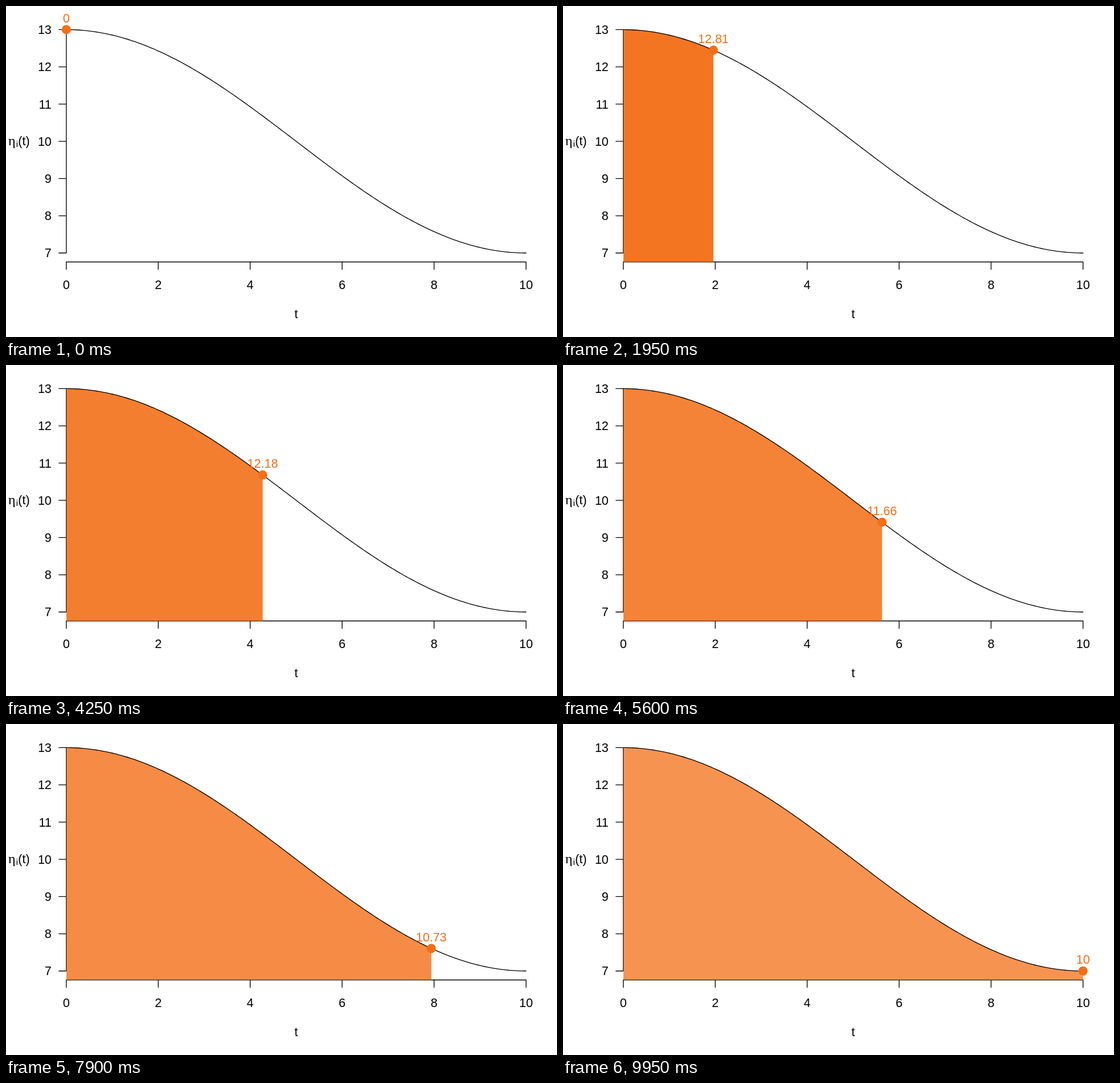
These frames come from a looping animation (966 by 580 pixels, 10 s). An HTML page:

```html
<!DOCTYPE html>
<html lang="en">
<head>
<meta charset="utf-8">
<title>Running mean of a curve</title>
<style>
  html, body { margin: 0; width: 100%; height: 100%; overflow: hidden; background: #fff; }
  svg { display: block; width: 966px; height: 580px; }
  text { font: 21.5px "Liberation Sans", Arial, sans-serif; }
  .line { fill: none; stroke: #000; stroke-width: 1.34; stroke-linecap: round; stroke-linejoin: round; }
  .mid { text-anchor: middle; }
  .end { text-anchor: end; }
  .eta { font: 24px "Liberation Serif", serif; }
  .sub { font-size: 15px; }
  .hot { fill: #f36f17; }
</style>
</head>
<body>
<svg viewBox="0 0 966 580">
  <clipPath id="swept"><rect id="window" x="105.7" y="0" width="0" height="580"/></clipPath>
  <g id="axes">
    <text class="eta" x="4" y="243.5">η</text>
    <text class="sub" x="17.8" y="247">i</text>
    <text x="21.3" y="243.5">(t)</text>
    <text class="mid" x="508.7" y="547.3">t</text>
  </g>
  <path id="area" class="hot" clip-path="url(#swept)"/>
  <path id="curve" class="line"/>
  <circle id="dot" class="hot" r="8.06"/>
  <text id="label" class="hot mid"></text>
</svg>
<script>
  const NS = "http://www.w3.org/2000/svg";
  const LEFT = 105.7, BASE = 448.5, TICK = 13;
  const STEPS = 200, STEP_MS = 50, T_MAX = 10;

  const $ = id => document.getElementById(id);
  const px = t => LEFT + 80.6 * t;
  const py = v => 41.4 + 65.23 * (13 - v);
  const eta = t => 10 + 3 * Math.cos(Math.PI * t / T_MAX);

  // Mean of eta over [0, t]
  function mean(t) {
    const u = Math.PI * t / T_MAX;
    return u ? 10 + 3 * Math.sin(u) / u : 0;
  }

  function add(tag, attrs, text = "") {
    const el = document.createElementNS(NS, tag);
    for (const key in attrs) el.setAttribute(key, attrs[key]);
    el.textContent = text;
    $("axes").append(el);
  }

  function drawAxes() {
    let d = `M${px(0)} ${BASE}H${px(T_MAX)}M${px(0)} ${py(7)}V${py(13)}`;
    for (let t = 0; t <= T_MAX; t += 2) {
      d += `M${px(t)} ${BASE}v${TICK}`;
      add("text", { class: "mid", x: px(t), y: 495.7 }, t);
    }
    for (let v = 7; v <= 13; v++) {
      d += `M${LEFT} ${py(v)}h${-TICK}`;
      add("text", { class: "end", x: 79.8, y: py(v) + 7.7 }, v);
    }
    add("path", { class: "line", d });
  }

  function drawCurve() {
    const pts = Array.from({ length: 201 }, (_, i) => {
      const t = T_MAX * i / 200;
      return `${px(t).toFixed(2)} ${py(eta(t)).toFixed(2)}`;
    }).join("L");
    $("curve").setAttribute("d", `M${pts}`);
    $("area").setAttribute("d", `M${pts}V${BASE}H${LEFT}Z`);
  }

  function show(step) {
    const t = T_MAX * step / (STEPS - 1);
    const x = px(t), y = py(eta(t));
    $("window").setAttribute("width", x - LEFT);
    $("area").setAttribute("fill-opacity", 1 - 0.025 * t);
    $("dot").setAttribute("cx", x);
    $("dot").setAttribute("cy", y);
    $("label").setAttribute("x", x);
    $("label").setAttribute("y", y - 12.3);
    $("label").textContent = +mean(t).toFixed(2);
  }

  drawAxes();
  drawCurve();
  show(0);

  let start;
  function tick(now) {
    start ??= now;
    show(Math.floor((now - start) / STEP_MS) % STEPS);
    requestAnimationFrame(tick);
  }
  requestAnimationFrame(tick);
</script>
</body>
</html>
```
